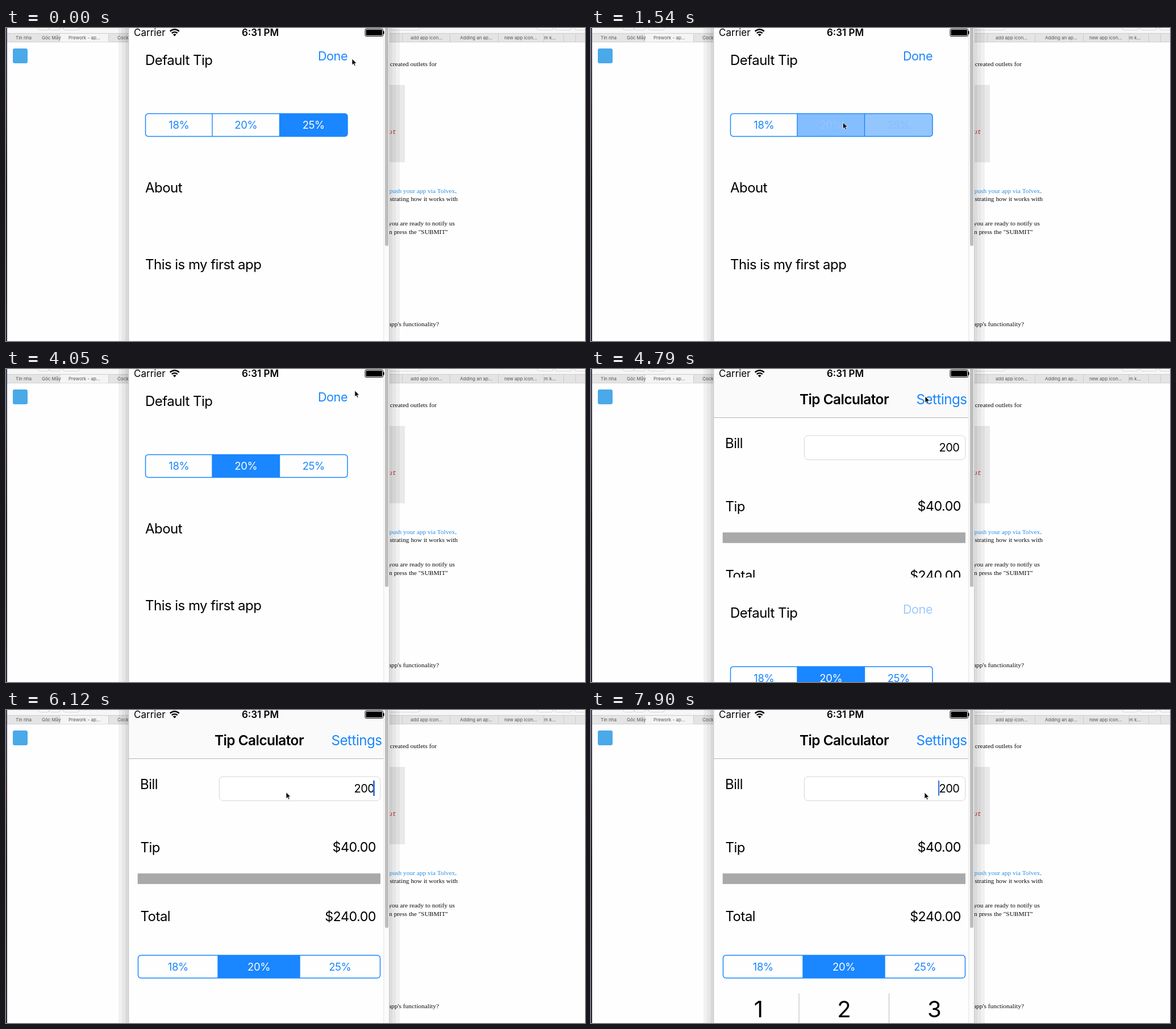
An HTML page for the animation above (8000 ms loop, 1019 by 550 pixels).

```html
<!DOCTYPE html>
<html lang="en">
<head>
<meta charset="utf-8">
<title>Tip calculator demo</title>
<style>
  html, body { margin: 0; width: 100%; height: 100%; overflow: hidden; background: #fefefe; }
  svg { display: block; width: 100%; height: 100%; }
  text { font-family: Inter, "Open Sans", sans-serif; white-space: pre; }
  .ui { letter-spacing: -.022em; }
  .status .ui { letter-spacing: 0; }
  .tab { font-size: 8px; fill: #555; }
  .serif { font-family: "Liberation Serif", serif; font-size: 11.4px; }
</style>
</head>
<body>
<svg id="stage" viewBox="0 0 1019 550"></svg>
<script>
const LOOP = 8000, BLUE = '#1a86ff', WHITE = '#fefefe';

// ---------- markup helpers ----------
const rect = (x, y, w, h, fill, more = '') =>
  `<rect x="${x}" y="${y}" width="${w}" height="${h}" fill="${fill}" ${more}/>`;
const text = (x, y, str, size, more = '') =>
  `<text class="ui" x="${x}" y="${y}" font-size="${size}" ${more}>${str}</text>`;
const tab = (x, str) => `<text class="tab" x="${x}" y="20">${str}</text>`;
const serif = (right, y, str, fill = '#0c0c0c') =>
  `<text class="serif" x="${right}" y="${y}" text-anchor="end" fill="${fill}">${str}</text>`;
const button = (x, w) =>
  rect(x, -10, w, 13.5, '#fff', 'rx="3" stroke="#cfcfcf" stroke-width="1"');

// A segmented control: edges holds the four x positions of its borders.
function segments(id, edges, y) {
  const labels = ['18%', '20%', '25%'], h = 40;
  const left = edges[0], w = edges[3] - left;
  let out = `<clipPath id="${id}Clip">${rect(left, y, w, h, '#000', 'rx="5"')}</clipPath>`;
  labels.forEach((label, i) => {
    const x = edges[i], sw = edges[i + 1] - x;
    out += rect(x, y, sw, h, WHITE, `id="${id}Fill${i}" clip-path="url(#${id}Clip)"`);
    if (i) out += rect(x - .7, y, 1.4, h, BLUE);
    out += text(x + sw / 2, y + 26.8, label, 18.5, `id="${id}Label${i}" text-anchor="middle" fill="${BLUE}"`);
  });
  return out + rect(left, y, w, h, 'none', `rx="5" stroke="${BLUE}" stroke-width="1.5"`);
}

// ---------- scene parts ----------
const browser = () =>
  rect(0, 0, 1019, 9, '#f6f6f6') +
  rect(0, 9, 1019, 16, '#e4e4e4') +
  rect(0, 9, 1019, .8, '#c9c9c9') + rect(0, 24.4, 1019, .8, '#cacaca') +
  rect(94, 10, 86, 14.4, '#f4f4f4') +
  [94, 180, 697, 781, 866, 946, 981, 1002].map(x => rect(x, 10, .8, 14, '#c6c6c6')).join('') +
  [[57, 19], [76, 19], [101, 28], [640, 88], [935, 28], [967, 28], [1001, 30]]
    .map(b => button(...b)).join('') +
  tab(17, 'Tin nha') + tab(63, 'Góc Mây') + tab(110, 'Prework - ap...') + tab(196, 'Cock') +
  tab(712, 'add app icon...') + tab(799, 'Adding an ap...') + tab(877, 'new app icon...') + tab(947, 'm k...') +
  rect(0, 0, 2, 550, 'url(#desk)') +
  rect(12, 36, 26, 26, '#4aa9e9', 'rx="3"') +
  rect(640, 100, 62, 136, '#e9e9e9');

const shadows = () =>
  [[198, 6, .05], [204, 6, .09], [210, 6, .14], [675, 5, .13], [680, 6, .09], [686, 7, .05]]
    .map(([x, w, a]) => rect(x, 0, w, 550, '#000', `opacity="${a}"`)).join('');

const article = () =>
  serif(758, 67, 'created outlets for') +
  '<text x="673" y="186" font-size="11.5" font-style="italic" fill="#b3262e" style="font-family:\'Liberation Mono\',monospace">ut</text>' +
  serif(793, 290, 'push your app via Tolvex<tspan fill="#0c0c0c">.</tspan>', '#2b8fe0') +
  serif(795, 304, 'nstrating how it works with') +
  serif(790, 347, 'you are ready to notify us') +
  serif(778, 361.5, 'en press the "SUBMIT"') +
  serif(762, 524, "app's functionality?");

const mainView = () =>
  rect(216, 0, 449, 550, WHITE) +
  rect(216, 0, 449, 85, '#fafafa') + rect(216, 85, 449, 1, '#b4b4b4') +
  text(445.5, 62, 'Tip Calculator', 24.4, 'text-anchor="middle" font-weight="600"') +
  text(661.5, 62, 'Settings', 24.2, `text-anchor="end" fill="${BLUE}"`) +
  text(236, 138.5, 'Bill', 24) +
  rect(375.3, 117, 283.5, 42.5, '#fff', 'rx="7" stroke="#d4d4d4" stroke-width="1"') +
  rect(612, 124, 37, 27, '#2379e0', 'id="highlight"') +
  text(648.5, 145, '200', 20, 'text-anchor="end"') +
  text(236.5, 249.5, 'Tip', 24) +
  text(651, 249, '$40.00', 23.3, 'text-anchor="end"') +
  rect(231.7, 287.2, 427.3, 18.6, '#a9a9a9') +
  text(236.5, 371.3, 'Total', 24) +
  text(651, 371, '$240.00', 23.3, 'text-anchor="end"') +
  segments('main', [232.5, 373, 517, 658.5], 431) +
  rect(646, 124, 3, 27, '#3a74dc', 'id="caretEnd"') +
  rect(611, 124, 2.2, 26.5, '#3a74dc', 'id="caretStart"');

const keyboard = () =>
  `<g id="keys">${rect(216, 497, 449, 240, WHITE)}` +
  rect(365.6, 498, 1, 240, '#b9b9b9') + rect(524, 498, 1, 240, '#b9b9b9') +
  [294.5, 445, 604].map((x, i) => text(x, 540, i + 1, 40, 'text-anchor="middle"')).join('') + '</g>';

const selection = () =>
  '<g id="handles" fill="#2379e0">' +
  rect(610.7, 120, 2.6, 31, '#2379e0') + '<circle cx="611.8" cy="117.8" r="7.2"/>' +
  rect(648, 124, 1.6, 32, '#2379e0') + '<circle cx="648.8" cy="157.4" r="7.2"/></g>' +
  '<g id="menu"><path fill="#1a1a1a" d="M306 48H649q10 0 10 10V89q0 10-10 10H642L629.5 111.5L617 99H306q-10 0-10-10V58q0-10 10-10Z"/>' +
  [377, 474, 616].map(x => rect(x, 48, 1, 51, '#fff', 'opacity=".55"')).join('') +
  [[336, 'Cut'], [427, 'Copy'], [545, 'Replace...']]
    .map(([x, s]) => text(x, 81, s, 20, 'text-anchor="middle" fill="#fff"')).join('') +
  '<path d="M632 67v14l11-7Z" fill="#fff"/></g>';

const settings = () =>
  `<g id="sheet">${rect(216, -6, 449, 900, WHITE)}` +
  text(245, 64.5, 'Default Tip', 24) +
  text(601, 57.3, 'Done', 21.6, `id="done" text-anchor="end" fill="${BLUE}"`) +
  segments('tip', [245.5, 363, 481.5, 601], 150.5) +
  text(245, 289, 'About', 24) +
  text(245, 424, 'This is my first app', 24) + '</g>';

const statusBar = () =>
  '<g class="status">' + text(225, 14, 'Carrier', 17) +
  '<g fill="none" stroke="#000" stroke-width="2.4"><path d="M288.8 5.8a11.3 11.3 0 0 1 15.9 0M291.8 9.2a7 7 0 0 1 9.9 0"/></g>' +
  '<path d="M293.9 11.5a4.2 4.2 0 0 1 5.7 0L296.75 14.5Z"/>' +
  text(447.5, 14, '6:31 PM', 17, 'text-anchor="middle" font-weight="600"') +
  rect(632, 1.5, 31.5, 13, '#fff', 'rx="2" stroke="#000" stroke-width="1"') +
  rect(633.5, 3, 28.5, 10, '#000', 'rx="1"') + rect(664, 5.5, 1.5, 5, '#000') + '</g>';

const stage = document.getElementById('stage');
stage.innerHTML =
  `<defs><linearGradient id="desk" x2="0" y2="1">
     <stop offset="0" stop-color="#39455f"/><stop offset=".25" stop-color="#3a2a3c"/>
     <stop offset=".5" stop-color="#16161f"/><stop offset="1" stop-color="#222a3c"/>
   </linearGradient>
   <clipPath id="screen">${rect(216, 0, 448.5, 550, '#000')}</clipPath></defs>` +
  rect(0, 0, 1019, 550, WHITE) + browser() + shadows() + article() +
  `<g clip-path="url(#screen)">${mainView()}${keyboard()}${selection()}${settings()}</g>` +
  rect(664.3, 0, 10.4, 550, '#fbfbfb') + rect(664.3, 0, 1, 550, '#e4e4e4') +
  rect(667, -10, 6, 393, '#bdbdbd', 'rx="3"') + rect(674, 0, 1, 550, '#c8c8c8') +
  rect(215.3, 0, 1, 550, '#c4c4c4') + statusBar() +
  '<path id="cursor" fill="#000" stroke="#fff" stroke-width=".8" d="M0 0V11.2L2.6 8.8L4.3 12.8L6.2 12L4.5 8.1H8Z"/>';

const el = id => document.getElementById(id);
const show = (id, alpha) => el(id).setAttribute('opacity', +alpha);
const move = (id, x, y) => el(id).setAttribute('transform', `translate(${x} ${y})`);

// ---------- timing ----------
// The picture only refreshes in bursts, on a 10 ms grid: [first, last, count].
const BURSTS = [[600, 1100, 4], [1400, 2430, 8], [2580, 3620, 8], [3760, 4790, 8],
  [4940, 5830, 7], [6120, 6120, 1], [6410, 7310, 7], [7460, 7900, 4]];
const TICKS = [0].concat(...BURSTS.map(([first, last, n]) =>
  Array.from({ length: n }, (_, i) =>
    Math.floor((first + (last - first) * i / Math.max(1, n - 1)) / 10) * 10)));

const PATH = [[480, 609, 54], [1100, 443.5, 166], [1750, 443.5, 166], [2430, 285, 288],
  [2580, 268, 310], [2870, 390.5, 387], [3020, 440, 449], [3620, 668, 15], [3760, 664, 18],
  [4200, 588, 48], [4900, 588, 48], [5830, 494, 144], [6120, 493, 144.5], [6860, 493, 144.5],
  [7310, 547, 145], [7900, 587, 145]];

const ramp = (t, a, b) => Math.min(1, Math.max(0, (t - a) / (b - a)));
const smooth = p => p * p * (3 - 2 * p);
const within = (t, a, b) => t >= a && t < b;

function pointer(t) {
  const i = PATH.findIndex(k => k[0] >= t);
  if (i < 1) return (i ? PATH[PATH.length - 1] : PATH[0]).slice(1);
  const [t0, x0, y0] = PATH[i - 1], [t1, x1, y1] = PATH[i];
  const p = ramp(t, t0, t1);
  return [x0 + (x1 - x0) * p, y0 + (y1 - y0) * p];
}

function mix(a, b, p) {
  const rgb = a.map((v, i) => Math.round(v + (b[i] - v) * p));
  return `rgb(${rgb})`;
}
function paint(id, i, on) {
  const white = [254, 254, 254], blue = [26, 134, 255];
  el(`${id}Fill${i}`).setAttribute('fill', mix(white, blue, on));
  el(`${id}Label${i}`).setAttribute('fill', mix(blue, white, on));
}

function draw(time) {
  const t = TICKS.filter(k => k <= time + .5).pop();

  const pick = ramp(t, 1380, 1680);
  paint('tip', 1, pick);
  paint('tip', 2, 1 - pick);

  move('sheet', 0, 799 * smooth(ramp(t, 4600, 4998)));
  show('done', t >= 4450 ? .42 : 1);

  move('keys', 0, 56 * (1 - smooth(ramp(t, 6310, 6560))));
  const menu = .2 * ramp(t, 6640, 6710) + .7 * ramp(t, 6710, 6860) - .9 * ramp(t, 7040, 7250);
  show('menu', Math.max(0, menu));
  show('handles', within(t, 6700, 7250));
  show('highlight', within(t, 6800, 7250) ? .2 : 0);
  show('caretEnd', within(t, 6100, 6700));
  show('caretStart', within(t, 7250, 7590) || t >= 7850);

  move('cursor', ...pointer(t));
}

paint('main', 1, 1);
const start = performance.now();
function frame() {
  draw((performance.now() - start) % LOOP);
  requestAnimationFrame(frame);
}
frame();
</script>
</body>
</html>
```
